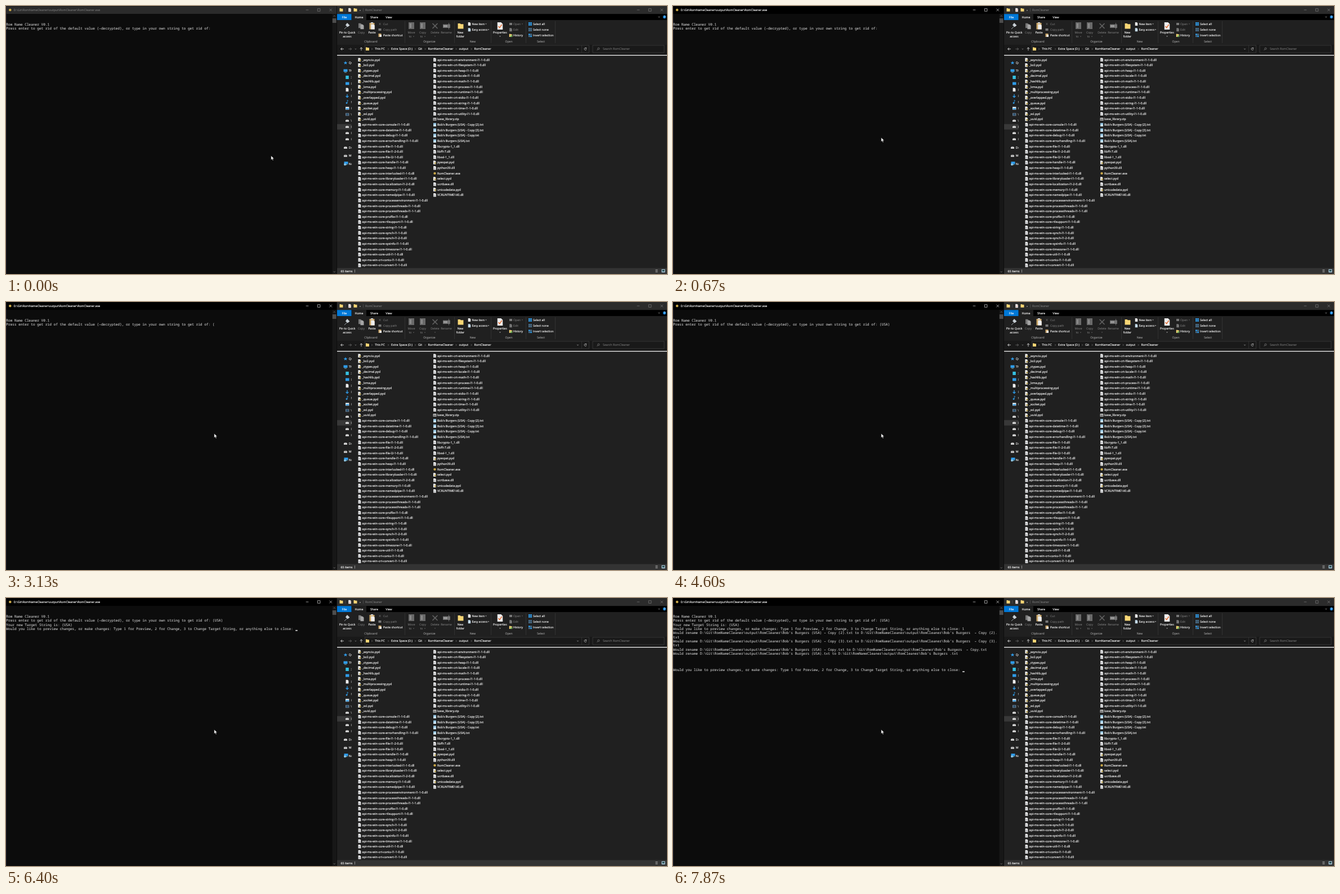
An HTML page for the animation above (8000 ms loop, 1174 by 477 pixels).

```html
<!DOCTYPE html>
<html lang="en">
<head>
<meta charset="utf-8">
<title>Rom Name Cleaner</title>
<style>
html, body { margin: 0; width: 100%; height: 100%; overflow: hidden; background: #0c0c0c; }
svg { display: block; }
text { font: 5.15px "Open Sans", "Noto Sans", sans-serif; fill: #fff; stroke: #fff; stroke-width: .13px; white-space: pre; text-rendering: geometricPrecision; }
.file { font-size: 5.38px; }
.ui { font-size: 5.27px; }
.dim { fill: #8c8c8c; stroke: none; }
.mid { text-anchor: middle; }
.group { fill: #c4c4c4; stroke: none; }
.term { font: 6.11px "Noto Sans Mono", "DejaVu Sans Mono", monospace; fill: #ccc; stroke: #ccc; stroke-width: .08px; }
</style>
</head>
<body>
<svg id="stage" width="1174" height="477" viewBox="0 0 1174 477"></svg>
<script>
const LOOP = 8000, CELL = 3.668, LINE = 7.335;
const FOLDER = '#f8d675', BLUE = '#2f9be8', WHITE = '#eee', GREY = '#777', INACTIVE = '#2b2b2b';

const rect = (x, y, w, h, fill, extra = '') =>
  `<rect x="${x}" y="${y}" width="${w}" height="${h}" fill="${fill}" ${extra}/>`;
const line = (d, stroke = WHITE, width = .6) =>
  `<path d="${d}" fill="none" stroke="${stroke}" stroke-width="${width}"/>`;
const shape = (d, fill) => `<path d="${d}" fill="${fill}"/>`;
const dot = (x, y, r, fill) => `<circle cx="${x}" cy="${y}" r="${r}" fill="${fill}"/>`;
const escape = s => s.replace(/&/g, '&amp;').replace(/</g, '&lt;');
// Text placed by the vertical middle of its line.
const text = (x, cy, s, cls = '') => `<text x="${x}" y="${cy + 1.9}" class="${cls}">${escape(s)}</text>`;

const chevron = (x, y, color = WHITE) => line(`M${x - 1.3} ${y - .6}l1.3 1.3 1.3-1.3`, color);
const crumb = (x, y) => line(`M${x - .6} ${y - 1.3}l1.3 1.3-1.3 1.3`, '#ccc', .5);
const caret = (x, y, color = WHITE) => shape(`M${x - 1.2} ${y - .6}h2.4l-1.2 1.4z`, color);
const folder = (x, y, s = 1) =>
  shape(`M${x - 3 * s} ${y - 3 * s}h${2.4 * s}l${.7 * s} ${.8 * s}h${2.9 * s}v${5 * s}h${-6 * s}z`, FOLDER);
const page = (x, y, w, h, fill = WHITE) => shape(
  `M${x - w / 2} ${y - h / 2}h${w * .68}l${w * .32} ${w * .32}v${h - w * .32}h${-w}z`, fill);
const windowButtons = (x, color) =>
  line(`M${x - 2.3} 7h4.6`, color) +
  line(`M${x + 18.4} 4.7h4.6v4.6h-4.6z`, color) +
  line(`M${x + 39.4} 4.7l4.6 4.6m0-4.6l-4.6 4.6`, color);

const fileIcon = {
  dll: (x, y) => page(x, y, 4.8, 6.4) + `<circle cx="${x}" cy="${y + .6}" r="1.2" fill="none" stroke="#8a9099" stroke-width=".7"/>`,
  pyd: (x, y) => page(x - .3, y, 4.6, 6.4) + dot(x + .9, y + 1, 1.6, '#b09a4c'),
  zip: (x, y) => rect(x - 2.8, y - 2.5, 5.6, 5, WHITE) + rect(x - 1.8, y - 1.5, 1.5, 3.6, '#333') + rect(x + .6, y - 1.5, 1.2, 3.6, '#333'),
  txt: (x, y) => rect(x - 2.5, y - 3, 5, 6, '#a9d4ee') + rect(x - 2.5, y - 3, 5, 1, '#5f8ba6') + rect(x - 2.5, y + 1.4, 5, 1.6, '#e8f2f7'),
  exe: (x, y) => dot(x, y, 2.2, '#c9a747'),
};

const core = ('console datetime debug errorhandling file:l1-1-0 file:l1-2-0 file:l2-1-0 handle heap interlocked ' +
  'libraryloader localization:l1-2-0 memory namedpipe processenvironment processthreads processthreads:l1-1-1 ' +
  'profile rtlsupport string synch synch:l1-2-0 sysinfo timezone util').split(' ').map(s => 'core-' + s);
const crt = 'conio convert environment filesystem heap locale math process runtime stdio string time utility'
  .split(' ').map(s => 'crt-' + s);
const apiName = s => {
  const [name, version = 'l1-1-0'] = s.split(':');
  return `api-ms-win-${name}-${version}.dll`;
};
const files = [
  ...'asyncio bz2 ctypes decimal hashlib lzma multiprocessing overlapped queue socket ssl uuid'
    .split(' ').map(s => `_${s}.pyd`),
  ...[...core, ...crt].map(apiName),
  'base_library.zip',
  ...[' - Copy (2)', ' - Copy (3)', ' - Copy', ''].map(s => `Bob's Burgers (USA)${s}.txt`),
  ...('libcrypto-1_1.dll libffi-7.dll libssl-1_1.dll pyexpat.pyd python39.dll RomCleaner.exe ' +
    'select.pyd ucrtbase.dll unicodedata.pyd VCRUNTIME140.dll').split(' '),
];

function fileList() {
  return files.map((name, i) => {
    const x = i < 39 ? 628 : 761.5, y = 95.6 + (i % 39) * 9.63;
    return fileIcon[name.slice(-3)](x, y) + text(x + 4.4, y, name, 'file');
  }).join('');
}

function ribbon() {
  const label = (x, y, s, dim) => text(x, y, s, 'mid' + (dim ? ' dim' : ''));
  const small = (x, y, s, dim) => text(x, y, s, dim ? 'dim' : '');
  let out = rect(588, 25, 586, 44, '#202020');
  for (const x of [708.5, 796, 861.5, 923.5, 975.5]) out += rect(x, 27, .5, 39, '#444');
  [[648, 'Clipboard'], [752, 'Organize'], [829, 'New'], [893, 'Open'], [950, 'Select']]
    .forEach(([x, s]) => out += text(x, 62.8, s, 'mid group'));

  out += line('M601 41l4-4', '#bcc6cf', .8) + shape('M603 34l3-4 4.5 4.5-4 3z', '#c8d0d6');
  out += label(606, 47.5, 'Pin to Quick') + label(606, 54.3, 'access');
  out += page(629, 35, 6, 8.5, GREY) + page(632.5, 37, 6, 8.5, '#a5a5a5') + label(631, 47.5, 'Copy', true);
  out += rect(645.5, 30, 9, 11.5, '#c9a464') + rect(648, 29, 4, 2, '#ddd') + page(651.5, 37, 6.5, 9) + label(650, 47.5, 'Paste');
  out += line('M662.5 30l3 4m0-4l-3 4', GREY) + small(670, 32, 'Cut', true);
  out += rect(661.5, 40, 5, 4, GREY) + small(670, 42.2, 'Copy path', true);
  out += rect(661.5, 49, 5, 6, '#c9a464') + rect(663.5, 51, 3.5, 4, WHITE) + small(670, 52.3, 'Paste shortcut');

  for (const [x, s] of [[720, 'Move'], [740, 'Copy']])
    out += rect(x - 5, 29, 10, 12, '#696969') + rect(x - 3, 31, 3, 8, '#8a8a8a') +
      label(x, 47.5, s, true) + label(x - 2, 54.3, 'to', true) + caret(x + 4, 54.3, GREY);
  out += line('M757.5 31l9 9m0-9l-9 9', '#606060', 1.6) + label(762, 47.5, 'Delete', true) + caret(762, 54, GREY);
  out += rect(776, 32.5, 13, 6.5, '#696969') + rect(777, 34, 7, 3.5, '#999') + line('M786.5 30v11.5', '#999') + label(782, 47.5, 'Rename', true);

  out += folder(807.5, 36, 1.65) + label(807, 47.5, 'New') + label(807, 54.3, 'folder');
  out += page(823, 32, 4.5, 6) + small(827.5, 32, 'New item') + caret(852.5, 32);
  out += page(823, 42.2, 4.5, 6, '#c5dced') + small(827.5, 42.2, 'Easy access') + caret(857, 42.2);

  out += page(877.5, 35.5, 9.5, 13) + line('M874.5 36l2.2 2.6 4-5.6', '#e46a2f', 1.4) + label(877.5, 47.5, 'Properties') + caret(877.5, 54);
  out += rect(894, 30, 5, 4, GREY) + small(901, 32, 'Open', true) + caret(917, 32, GREY);
  out += page(896.5, 42.2, 4.5, 6, GREY) + small(901, 42.2, 'Edit', true);
  out += folder(896.5, 52.5, .9) + dot(897.5, 53.5, 1.7, '#62a85a') + small(901, 52.3, 'History');

  ['Select all', 'Select none', 'Invert selection'].forEach((s, i) => {
    const y = 32 + i * 10.15;
    for (let k = 0; k < 4; k++) {
      const fill = i === 1 || i === 2 && k % 3 ? '#4c7390' : BLUE;
      out += rect(928 + (k % 2) * 3.2, y - 3 + (k >> 1) * 3.2, 2.7, 2.7, fill);
    }
    out += small(936, y, s);
  });
  return out;
}

function addressRow() {
  let out = rect(588, 69, 586, 19, '#191919');
  out += line('M599.8 76.5h-5.2m2.3-2.3l-2.3 2.3 2.3 2.3', WHITE, .8);
  out += line('M608.4 76.5h5.2m-2.3-2.3l2.3 2.3-2.3 2.3', GREY, .7);
  out += chevron(621, 76.5, '#bbb') + line('M631 79.3v-5.4m-2.3 2.3l2.3-2.3 2.3 2.3', WHITE, .8);
  out += rect(637.3, 70, 398.5, 13, '#191919', 'stroke="#505050" stroke-width=".5"');
  out += rect(1042, 70, 127, 13, '#191919', 'stroke="#505050" stroke-width=".5"');
  out += folder(642, 76.5);
  [[655, 'This PC'], [684, 'Extra Space (D:)'], [732, 'Git'], [749.5, 'RomNameCleaner'], [804.5, 'output'], [831.5, 'RomCleaner']]
    .forEach(([x, s]) => out += crumb(x - 5, 76.5) + text(x, 76.5, s, 'ui'));
  out += chevron(1015.5, 76.5) + rect(1022, 70, .5, 13, '#444');
  out += line('M1030.6 75.2a2 2 0 1 0 .4 1.6m-.2-3v1.7h-1.7', WHITE);
  out += `<circle cx="1052.5" cy="75.8" r="1.6" fill="none" stroke="#aaa" stroke-width=".5"/>` + line('M1051.4 77l-1.8 1.8', '#aaa');
  return out + text(1060, 76.5, 'Search RomCleaner', 'ui dim') + rect(588, 87, 586, 1.3, '#f4f4f4');
}

function navPane() {
  const drive = (x, y) => rect(x - 3, y - 1, 6, 3, '#d0d0d0') + rect(x - 2, y - 2, 4, 1, '#888');
  const monitor = (x, y) => rect(x - 3.5, y - 3, 7, 4.6, BLUE) + rect(x - 2, y + 2.2, 4, .8, '#9cc');
  let out = rect(588, 210.2, 27, 9.6, '#383838');
  out += shape('M603 98l1 2.2h2.5l-2 1.5.8 2.4-2.3-1.5-2.3 1.5.8-2.4-2-1.5h2.5z', BLUE) + monitor(603, 115.5);
  out += rect(603.3, 124, 5.5, 6, '#35bfe0') + rect(603, 135.5, 6.5, 5, BLUE) + page(606, 149, 4.8, 6.4);
  out += line('M606 157v5.5m-2.4-2.3l2.4 2.4 2.4-2.4', BLUE, 1.3);
  out += dot(605, 172.7, 1.4, BLUE) + line('M606.2 172.5v-5l2 1.5', BLUE, .8);
  out += rect(603, 179.5, 6.4, 5, '#d9e8f3') + rect(603.6, 182, 5.2, 2, BLUE);
  out += rect(603, 190.5, 6.4, 5, '#6f7f91') + rect(604.2, 191.2, 4, 3.6, '#2b516f');
  for (const y of [204, 215, 226, 237]) out += drive(606, y);
  out += drive(603, 252) + drive(603, 266.5) + monitor(604, 280) + dot(602, 282, 1.9, '#8fcaec');
  [[101, 'Quick access'], [115.5, 'This PC'], [252, 'Drive'], [266.5, 'Media'], [281, 'Network']]
    .forEach(([y, s]) => out += text(608.8, y, s, 'ui'));
  [...'3DDDMPVWEEF'].forEach((s, i) => out += text(612.4, 127 + i * 11, s, 'ui'));
  return `<clipPath id="pane"><path d="M588 89h25.6v376h-25.6z"/></clipPath><g clip-path="url(#pane)">${out}</g>`;
}

function explorer() {
  let out = rect(588, 0, 586, 477, '#202020') + rect(588, 0, 586, 14.2, INACTIVE) + rect(588, 14.2, 586, 10.8, '#000');
  out += folder(595.5, 7) + rect(602.5, 4, .4, 6, '#777') + page(610.5, 7, 4.6, 6.4) + line('M609.3 7.3l1 1 1.7-2.3', '#d34b32') +
    folder(620.5, 7) + caret(629, 8) + rect(634, 4, .4, 6, '#777') + text(638, 7, 'RomCleaner', 'ui dim');
  out += windowButtons(1123, '#8c8c8c');
  out += rect(588, 14.2, 25.6, 10.8, '#0078d7') + rect(614, 14.2, 26, 11, '#202020');
  [[601, 'File'], [627, 'Home'], [654, 'Share'], [680, 'View']].forEach(([x, s]) => out += text(x, 19.7, s, 'mid ui'));
  out += chevron(1160, 19.5) + dot(1169.5, 19.5, 2.7, '#1683d8') + text(1169.5, 19.3, '?', 'mid');
  out += ribbon() + addressRow() + navPane() + fileList();
  out += rect(588, 466.5, 586, 10.5, '#333') + text(594.5, 471.8, '65 items', 'ui') + rect(619.5, 469, .5, 5.5, WHITE);
  out += line('M1153.5 469.5h4m-4 2h4m-4 2h4', '#ddd') + rect(1164.5, 468.6, 6, 5.5, '#bfe0f5') + rect(1165.5, 469.6, 4, 3, '#244');
  return out + rect(587.3, 88, .6, 214, '#666');
}

function consoleFrame() {
  return rect(0, 0, 588, 477, '#0c0c0c') + rect(0, 0, .6, 477, '#2b2540') +
    `<g id="titlebar">${rect(.5, .5, 586.5, 13.5, '#000', 'id="titleback"')}` +
    dot(7.3, 7, 2.3, '#c9a747') +
    `<text id="title" class="ui" x="13.5" y="8.9">D:\\Git\\RomNameCleaner\\output\\RomCleaner\\RomCleaner.exe</text></g>` +
    `<g id="buttons"></g>` + rect(579.4, 14, 7.6, 463, '#171717') + rect(579.8, 22, 6.8, 8, '#4d4d4d') +
    line('M581.7 18.6l1.5-1.5 1.5 1.5M581.7 472.4l1.5 1.5 1.5-1.5', '#aaa') + `<g id="screen"></g>`;
}

const stage = document.getElementById('stage');
stage.innerHTML = explorer() + consoleFrame() + rect(0, 0, CELL, 1.8, '#ccc', 'id="caret"') +
  '<path id="mouse" d="M0 0v7.4l1.7-1.6 1.2 2.7 1.2-.5-1.2-2.7h2.4z" fill="#fff" stroke="#000" stroke-width=".4"/>';
const [titleBack, title, buttons, screenText, caretBox, mouse] =
  ['titleback', 'title', 'buttons', 'screen', 'caret', 'mouse'].map(id => document.getElementById(id));

const ask = 'Press enter to get rid of the default value (-decrypted), or type in your own string to get rid of: ';
const menu = 'Would you like to preview changes, or make changes: Type 1 for Preview, 2 for Change, 3 to Change Target String, or anything else to close: ';
const dir = 'D:\\Git\\RomNameCleaner\\output\\RomCleaner\\';
const rename = tail => `Would rename ${dir}Bob's Burgers (USA)${tail}.txt to ${dir}Bob's Burgers ${tail}.`;

const FOCUS = 600, ENTER = 4665, PICK = 6865, RESULT = 7130;
const keyTimes = [2465, 3198, 3330, 3530, 3798];
// Moments at which the text cursor turns on and off.
const caretOn = [[1198, 1730], [2262, 2995], [3198, 4330], [4928, 5462], [5930, 6462], [PICK, LOOP]];

function terminalLines(t) {
  const typed = '(USA)'.slice(0, keyTimes.filter(k => t >= k).length);
  const lines = ['Rom Name Cleaner V0.1', ask + typed];
  if (t >= ENTER) lines.push('Your new Target String is: (USA)', menu + (t >= PICK ? '1' : ''));
  if (t >= RESULT) lines.push(rename(' - Copy (2)'), 'txt', rename(' - Copy (3)'), 'txt',
    rename(' - Copy') + 'txt', rename('') + 'txt', '', '', '', menu);
  return lines;
}

let shown = '';
function draw(t) {
  const active = t >= FOCUS;
  const lines = terminalLines(t);
  const key = active + lines.join('\n');
  if (key !== shown) {
    shown = key;
    titleBack.setAttribute('fill', active ? '#000' : INACTIVE);
    title.setAttribute('class', active ? 'ui' : 'ui dim');
    buttons.innerHTML = windowButtons(535, active ? '#fff' : '#8c8c8c');
    screenText.innerHTML = lines.map((s, i) => `<text class="term" x=".3" y="${35 + i * LINE}">${escape(s)}</text>`).join('');
  }
  const last = lines.length - 1;
  caretBox.setAttribute('x', lines[last].length * CELL + .6);
  caretBox.setAttribute('y', 34.9 + last * LINE);
  caretBox.style.display = caretOn.some(([a, b]) => t >= a && t < b) ? '' : 'none';

  const u = Math.min(1, Math.max(0, (t - 30) / 500)), ease = u * u * (3 - 2 * u);
  mouse.setAttribute('transform', `translate(${470.8 - 101 * ease} ${266.5 - 32.3 * ease})`);
}

const start = performance.now();
function tick() {
  draw((performance.now() - start) % LOOP);
  requestAnimationFrame(tick);
}
draw(0);
tick();
</script>
</body>
</html>
```
